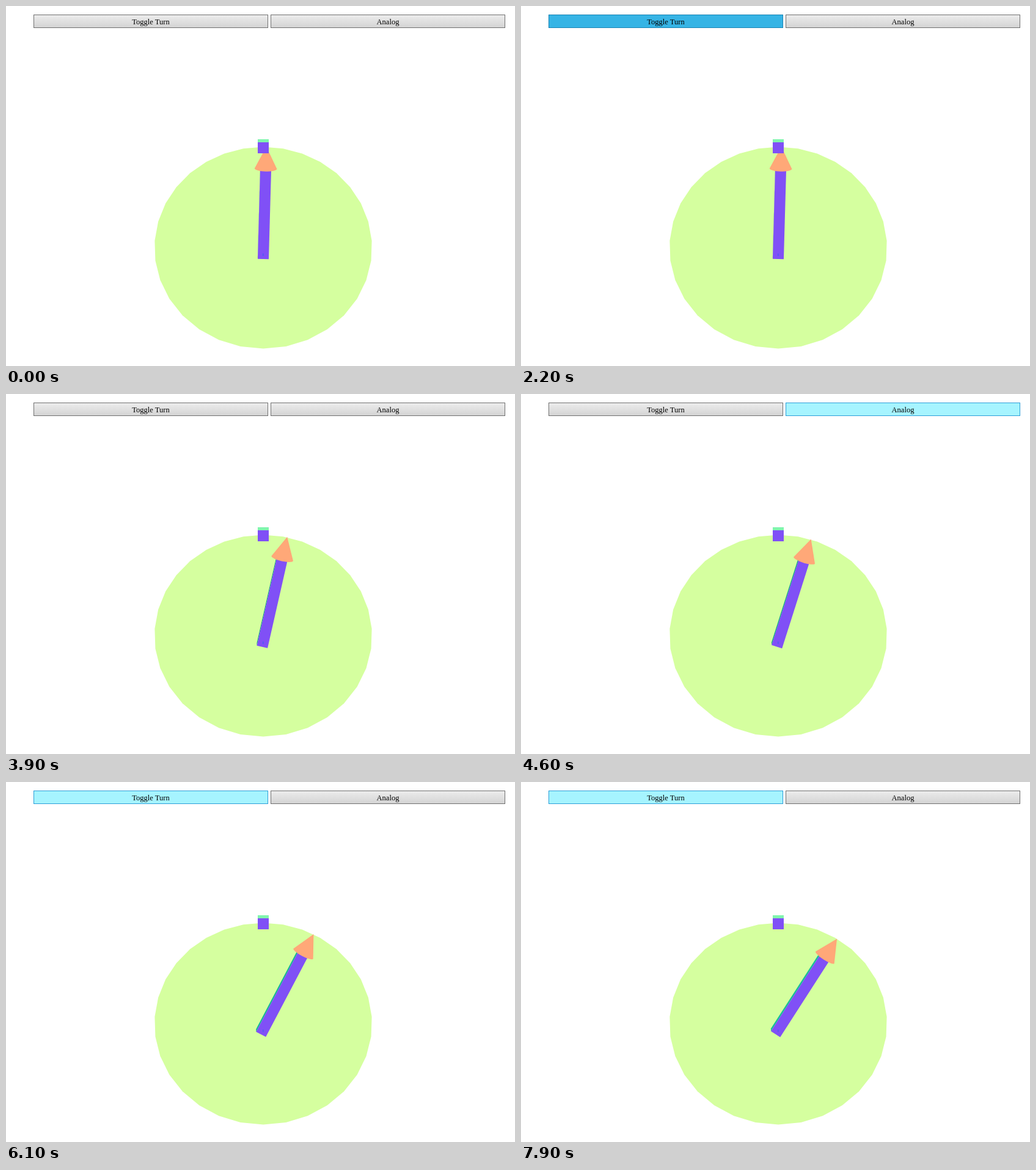
An HTML page with a canvas that plays this animation: 833 by 589 pixels, repeating every 8000 ms.

```html
<!DOCTYPE html>
<html lang="en">
<head>
<meta charset="utf-8">
<title>Turning arrow</title>
<style>
  html, body { margin: 0; width: 100%; height: 100%; overflow: hidden; background: #fff; }
  canvas { position: absolute; left: 0; top: 0; }
  .btn {
    position: absolute; top: 14px; width: 384px; height: 22px; box-sizing: border-box;
    border: 1px solid #707070; background: linear-gradient(#ececec, #d4d4d4);
    font: 12.5px/22px "Liberation Serif", serif; color: #000; text-align: center;
  }
  .hover { background: #a6f4ff; border-color: #2c9fd9; }
  .down { background: #36b4e5; border-color: #1a84b4; }
  #turn { left: 45px; }
  #analog { left: 433px; }
</style>
</head>
<body>
<canvas id="stage" width="833" height="589"></canvas>
<div class="btn" id="turn">Toggle Turn</div>
<div class="btn" id="analog">Analog</div>
<script>
const LOOP = 8000, STEP = 100;
const ctx = document.getElementById('stage').getContext('2d');
const turn = document.getElementById('turn');
const analog = document.getElementById('analog');

// [time, state], each held until the next entry
const turnStates = [
  [0, ''], [1400, 'hover'], [1500, ''], [1800, 'hover'], [2200, 'down'], [2300, 'hover'],
  [3700, ''], [5600, 'hover'], [6600, 'down'], [6700, 'hover'], [7600, 'down'], [7800, 'hover']
];
const analogStates = [[0, ''], [4100, 'hover'], [4700, '']];

// [time, degrees], linear between entries
const angles = [[0, 1.6], [2200, 1.6], [3900, 12.8], [5400, 23.2], [6700, 31.6], [7700, 31.6], [7900, 32.8], [8000, 32.8]];

const PIVOT = { x: 421.2, y: 405.4 };
const TILT = { sin: 0.37, cos: 0.93 };
const PURPLE = '#8050f6', MINT = '#80f6ae', LIME = '#d5ff9f', ORANGE = '#ffa878';

function stateAt(list, t) {
  let state = '';
  for (const [start, name] of list) if (t >= start) state = name;
  return state;
}

function angleAt(t) {
  const i = angles.findIndex(k => k[0] > t);
  const [t0, a0] = angles[i - 1], [t1, a1] = angles[i];
  return a0 + (a1 - a0) * (t - t0) / (t1 - t0);
}

function fillPoly(points, color) {
  ctx.fillStyle = color;
  ctx.beginPath();
  for (const [x, y] of points) ctx.lineTo(x, y);
  ctx.fill();
}

function drawDisc() {
  const points = [];
  for (let i = 0; i < 32; i++) {
    const a = i * Math.PI / 16;
    const w = 1 + 0.07 * Math.cos(a);
    points.push([421 + 177.6 * Math.sin(a) / w, 384 - 164.2 * Math.cos(a) / w]);
  }
  fillPoly(points, LIME);
}

function drawArrow(deg) {
  const a = deg * Math.PI / 180, s = Math.sin(a), c = Math.cos(a);
  const scale = 1 + deg * 0.0003;
  // side is across the arrow, along runs from the pivot to the tip
  const at = (side, along) => [
    PIVOT.x + side * c + along * s,
    PIVOT.y + side * s - along * c
  ];
  const base = 139.3 * scale, tip = 175.3 * scale;
  const tailL = at(-9, -8.5), headL = at(-9, base);

  // shaded by the direction the side face points to
  const shade = [-c, s * TILT.cos, s * TILT.sin].map(n => Math.round((n + 1) * 127.5));
  const raise = ([x, y]) => [x, y - 4.5];
  fillPoly([tailL, headL, raise(headL), raise(tailL)], `rgb(${shade})`);
  fillPoly([tailL, at(9, -8.5), at(9, base), headL], PURPLE);
  ctx.fillStyle = '#4a5cf0';
  ctx.fillRect(420, 405, 1.5, 4);

  const cone = [at(0, tip)];
  for (let i = 0; i <= 16; i++) {
    const b = i * Math.PI / 16;
    cone.push(at(18.2 * Math.cos(b), base - 4.6 * c * Math.sin(b)));
  }
  fillPoly(cone, ORANGE);
}

function drawMarker() {
  ctx.fillStyle = MINT;
  ctx.fillRect(412, 218, 18, 5);
  ctx.fillStyle = PURPLE;
  ctx.fillRect(412, 223, 18, 18);
}

function frame(now) {
  const t = Math.floor((now % LOOP) / STEP) * STEP;
  turn.className = 'btn ' + stateAt(turnStates, t);
  analog.className = 'btn ' + stateAt(analogStates, t);
  ctx.clearRect(0, 0, 833, 589);
  drawDisc();
  drawArrow(angleAt(t));
  drawMarker();
  requestAnimationFrame(frame);
}
frame(performance.now());
</script>
</body>
</html>
```
